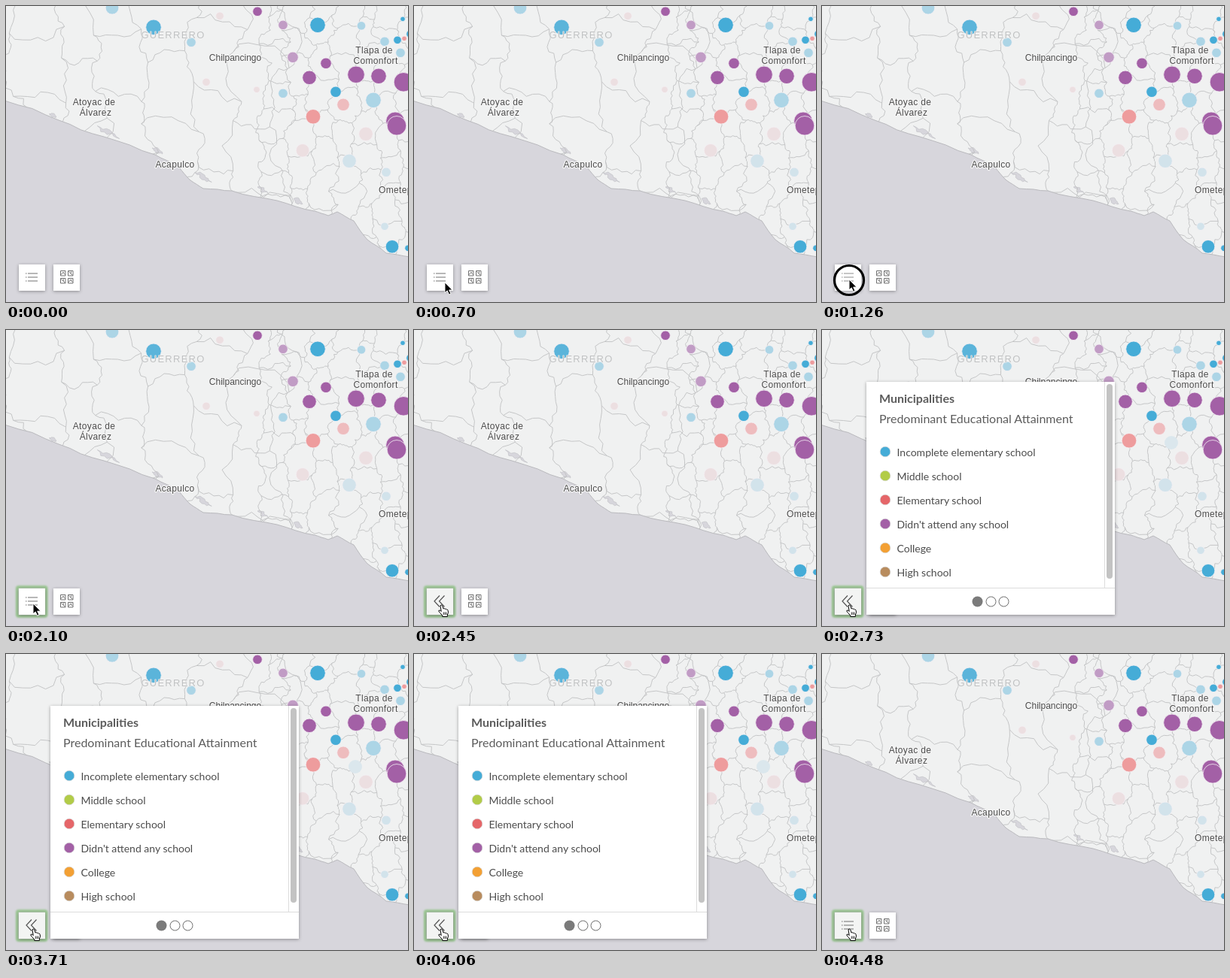
Recreate the animation shown at these times as an HTML page. Size 534x394 px, loop 4.69 s.

```html
<!DOCTYPE html>
<html lang="en">
<head>
<meta charset="utf-8">
<title>Map legend</title>
<style>
  html, body { margin: 0; width: 100%; height: 100%; overflow: hidden; background: #d7d6dc; }
  svg { display: block; width: 534px; height: 394px; }
  text { fill: #4c4c4c; }
  #labels text {
    font: 12px "Liberation Sans", Arial, sans-serif; text-anchor: middle; letter-spacing: .35px;
    paint-order: stroke; stroke: #f4f4f4; stroke-width: 2.5px; stroke-linejoin: round;
  }
  #labels .state { font-size: 13px; letter-spacing: 1.25px; fill: #bfc1c2; stroke-width: 1px; }
  #panel text { font: 14px Lato, sans-serif; }
  #panel .head { font-size: 16px; fill: #5c5c5c; }
  #panel .bold { font-weight: 700; }
  .icon { fill: none; stroke: #707070; }
  .shadow { filter: drop-shadow(0 1px 2px rgba(0, 0, 0, .35)); }
</style>
</head>
<body>
<svg viewBox="0 0 534 394">
  <defs>
    <filter id="soft" x="-20%" y="-20%" width="140%" height="140%"><feGaussianBlur stdDeviation=".8"/></filter>
    <clipPath id="ashore"><use href="#land"/></clipPath>
  </defs>
  <rect width="534" height="394" fill="#d7d6dc"/>
  <path id="land" fill="#f0f1f1" stroke="#b9b9bd"/>
  <g id="lagoons" fill="#d7d6dc" stroke="#c2c2c6" stroke-width=".6"></g>
  <path id="borders" clip-path="url(#ashore)" fill="none" stroke="#c0c1c2" stroke-width=".9"/>
  <g id="bubbles" stroke="#f4f0f4" stroke-width=".8"></g>
  <circle id="extra" cx="464" cy="150" r="9" fill="#dbe7ed"/>
  <g id="labels">
    <text class="state" x="222" y="43">GUERRERO</text>
    <text x="304.5" y="73" style="letter-spacing:0">Chilpancingo</text>
    <text x="489" y="63">Tlapa de</text>
    <text x="491" y="77">Comonfort</text>
    <text x="117" y="132">Atoyac de</text>
    <text x="119" y="146">Álvarez</text>
    <text x="224.5" y="215">Acapulco</text>
    <text x="495" y="249" style="text-anchor:start">Ometepec</text>
  </g>

  <rect class="shadow" x="63" y="344" width="35" height="35" fill="#fff"/>
  <g id="grid" class="icon"></g>

  <g id="panel">
    <rect class="shadow" x="59" y="69" width="330" height="310" fill="#fff"/>
    <path d="M375.5 69V343M59 343.5H389" stroke="#dcdcdc" fill="none"/>
    <rect x="378" y="72" width="8" height="259" rx="4" fill="#c3c3c3"/>
    <text class="head bold" x="76" y="97">Municipalities</text>
    <text class="head" x="76" y="124">Predominant Educational Attainment</text>
    <g id="legend"></g>
    <circle cx="206.5" cy="361.5" r="7" fill="#7b7b7b"/>
    <circle cx="224.5" cy="361.5" r="6.5" class="icon"/>
    <circle cx="241.5" cy="361.5" r="6.5" class="icon"/>
  </g>

  <rect id="glow" x="14.7" y="342" width="39" height="39" rx="2" fill="none" stroke="#96c58d" stroke-width="3.4" filter="url(#soft)"/>
  <rect id="button" class="shadow" x="17" y="344" width="35" height="35"/>
  <path id="list" class="icon" d="M29 356H42M29 361H42M29 366H42M26 356h1.5M26 361h1.5M26 366h1.5"/>
  <path id="chevrons" class="icon" d="M34 353.5l-7 7.5 7 7.5m6.5-15l-7 7.5 7 7.5" style="stroke:#555;stroke-width:1.2"/>
  <circle id="ring" cx="36" cy="365" fill="#fff" fill-opacity=".2" stroke="#000" stroke-width="3.2"/>
  <path id="arrow" d="M0 0V14L3.2 11L5.6 16.3L8 15.2L5.7 10.2H10Z" stroke="#fff"/>
  <g id="hand" transform="translate(32 365)" stroke="#000" stroke-linejoin="round">
    <path d="M3 1.8Q4.6.2 5.8 2L7 6Q8.4 5 9.2 6.4Q10.5 5.7 11.3 7.1Q12.8 6.7 13.2 8.4L13.5 11.5L12.3 14V16.5H5.8V15L2.5 11.5L.7 9Q1 7.3 3 8.4L4.2 9.6Z" fill="#fff"/>
    <path d="M7.3 10.5v3.5m1.9-3.5v3.5m1.8-3.5v3.5" stroke-width=".8"/>
  </g>
</svg>
<script>
const $ = id => document.getElementById(id);
const LOOP = 4690, STEP = 70;

let seed = 7;
const rand = () => (seed = seed * 16807 % 2147483647) / 2147483647 - .5;
const range = n => [...Array(n).keys()];
const points = text => text.split(' ').map(p => p.split(',').map(Number));

// Turns a few points into a naturally wandering line.
function wander(pts, depth, amount) {
  while (depth--) {
    pts = pts.flatMap((p, i) => {
      const q = pts[i + 1];
      if (!q) return [p];
      const dx = q[0] - p[0], dy = q[1] - p[1], off = rand() * amount;
      return [p, [(p[0] + q[0]) / 2 - dy * off, (p[1] + q[1]) / 2 + dx * off]];
    });
  }
  return 'M' + pts.map(p => p.map(v => v.toFixed(1)).join()).join('L');
}

// A jittered brick mesh: every upright edge, every second level one.
function mesh(left, right, dx, dy) {
  const cols = Math.ceil((right - left) / dx) + 1, rows = Math.ceil(350 / dy) + 2;
  const nodes = range(cols).map(i => range(rows).map(j =>
    [left + (i + rand() * .6) * dx, (j - .5 + rand() * .7) * dy]));
  return nodes.flatMap((col, i) => col.map((node, j) => {
    const down = col[j + 1], across = (i + j) % 2 && nodes[i + 1]?.[j];
    return (down ? wander([node, down], 3, .6) : '') + (across ? wander([node, across], 3, .5) : '');
  })).join('');
}

const coast = points('-2,126 70,152 130,174 198,198 230,215 245,232 262,243 300,246 360,259 410,273 428,279 440,274 462,286 480,311 505,329 536,334');
$('land').setAttribute('d', wander(coast, 2, .07) + 'V-2H-2Z');
$('borders').setAttribute('d', mesh(15, 330, 58, 46) + mesh(345, 540, 30, 21));

$('lagoons').innerHTML = points('62,146,5 136,168,17 201,193,8 262,228,13 341,245,8 388,260,7').map(([x, y, r]) =>
  `<path transform="translate(${x} ${y}) rotate(30)" d="${
    wander([[-r, 0], [0, -3.5], [r, 0], [0, 3.5], [-r, 0]], 2, .5)}Z"/>`).join('');

const BLUE = '#45acd7', PURPLE = '#a360a6';
const bubbles = {
  [BLUE]: '414,25,10 520,45,5 537,37,5 438,114,7 513,320,8.5 534,322,4 527,17,3',
  '#5bb4da': '196,28,10',
  '#acd5e6': '141,2,8.5 246,48,6 472,26,5.5 503,47,6 524,62,6 368,116,6 488,125,10',
  '#d2e3eb': '456,206,9 505,221,6 503,293,5',
  [PURPLE]: '334,7,6 425,76,7 403,95,9 465,91,11 495,93,10 528,101,12.5 517,153,12 519,159,12.5',
  '#c19cc5': '368,25,6 381,68,7',
  '#ee9c9d': '408,147,9.5 529,43,3',
  '#eebcbe': '448,131,8',
  '#ecdfe1': '284,13,5 333,111,4 478,170,9 394,192,8.5 266,101,5'
};
$('bubbles').innerHTML = Object.entries(bubbles).map(([fill, list]) => points(list).map(([x, y, r]) =>
  `<circle cx="${x}" cy="${y + .3}" r="${r + .3}" fill="${fill}"/>`).join('')).join('');

const legend = {
  'Incomplete elementary school': BLUE, 'Middle school': '#b2cc48', 'Elementary school': '#e56669',
  "Didn't attend any school": PURPLE, 'College': '#f3a034', 'High school': '#b88c5e'
};
$('legend').innerHTML = Object.entries(legend).map(([name, fill], i) =>
  `<circle cx="84" cy="${162 + 32 * i}" r="6.8" fill="${fill}" stroke="#d5d5d5" stroke-width=".7"/>
   <text x="99.5" y="${168 + 32 * i}">${name}</text>`).join('');

$('grid').innerHTML = range(4).map(i =>
  `<path transform="translate(${72.5 + i % 2 * 10} ${352.5 + (i >> 1) * 10})"
    d="M0 0h6.5v6.5h-6.5z${i % 3 ? 'M1 1l5 5M4 1v2' : 'M1 5l2-3 3 3M4 2h1'}"/>`).join('');

const part = (t, from, to) => Math.min(1, Math.max(0, (t - from) / (to - from)));
const show = (id, amount) => $(id).setAttribute('opacity', +amount);
const move = (id, x, y) => $(id).setAttribute('transform', `translate(${x} ${y})`);
const clicks = [{ at: 1260, grow: 2 }, { at: 2170, grow: 11 }, { at: 3780, grow: 11 }];

function draw(now) {
  const t = Math.floor(now % LOOP / STEP) * STEP;

  const open = part(t, 2450, 2590) - part(t, 4060, 4200);
  show('panel', open);
  move('panel', -4 * (1 - open), 0);
  show('extra', open);

  const opened = t >= 2450 && t < 4130;
  show('list', !opened);
  show('chevrons', opened);
  show('glow', part(t, 1330, 1610));
  $('button').setAttribute('fill', t < 2170 ? '#fff' : '#f3f4f3');

  const hand = t >= 2170;
  const glide = 1 - (1 - part(t, 350, 770)) ** 2, settle = part(t, 840, 1050);
  show('hand', hand);
  show('arrow', t >= 420 && !hand);
  move('arrow', 110 - 71 * glide - 3 * settle, 398 - 31 * glide - 3 * settle);

  const click = clicks.find(({ at }) => t >= at && t < at + 210);
  const age = click ? (t - click.at) / 210 : 1;
  show('ring', 1 - age);
  $('ring').setAttribute('r', 19.5 + (click ? click.grow * age : 0));
}

const begin = performance.now();
function tick() {
  draw(performance.now() - begin);
  requestAnimationFrame(tick);
}
tick();
</script>
</body>
</html>
```
